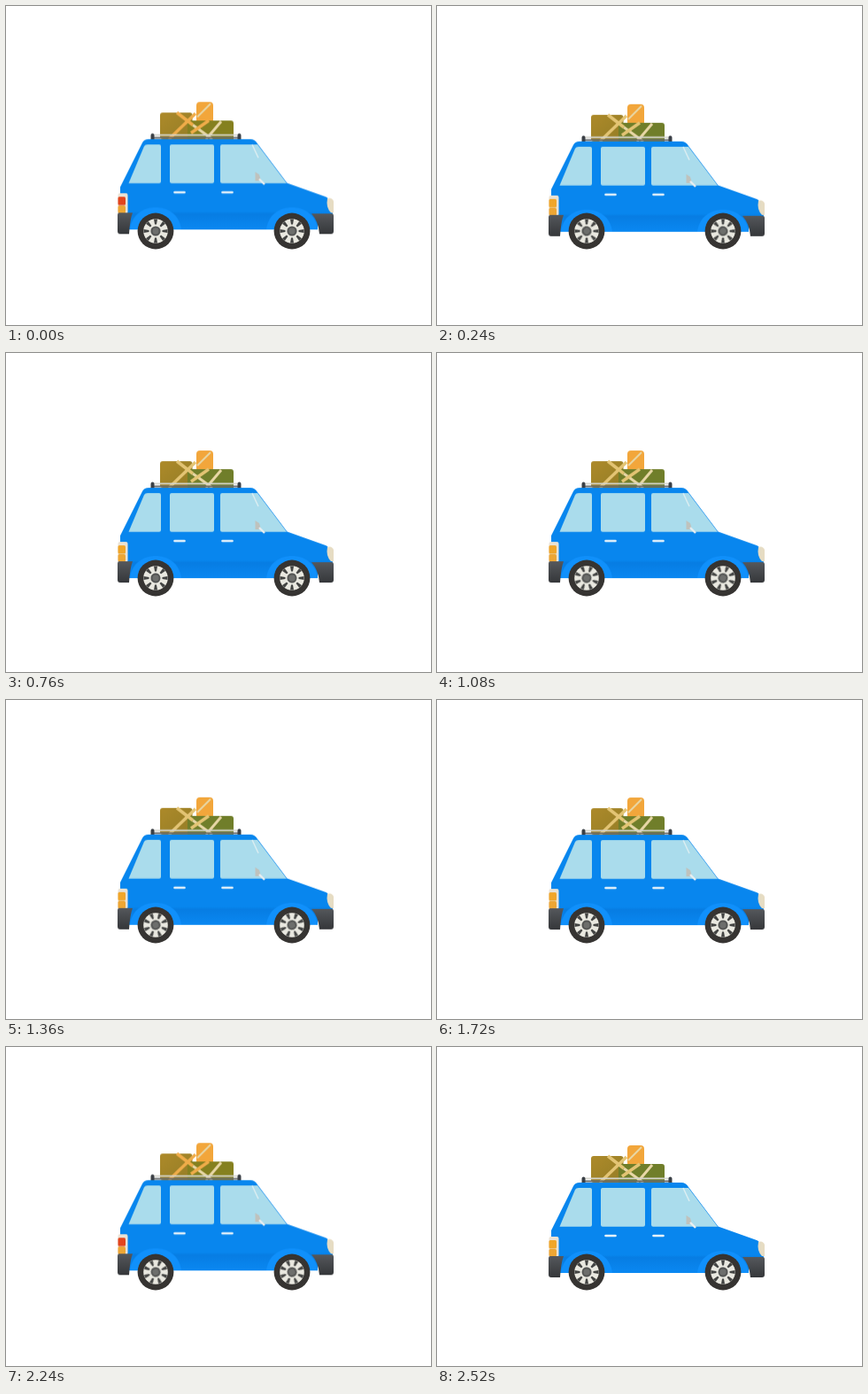
An HTML page for the animation above (2560 ms loop, 480 by 360 pixels).

```html
<!DOCTYPE html>
<html lang="en">
<head>
<meta charset="utf-8">
<title>Loaded car</title>
<style>
  html, body { margin: 0; width: 100%; height: 100%; overflow: hidden; background: #fff; }
  svg { display: block; width: 480px; height: 360px; }
  .car { animation: bounce 320ms step-end infinite; }
  .spin { animation: spin 640ms steps(16) infinite; }
  .lamp { fill: #f0a62a; animation: lamp 320ms step-end infinite; }
  .strap { stroke: #e3c474; animation: strap 320ms step-end infinite; }
  .case { fill: #707e2a; animation: case 320ms step-end infinite; }
  @keyframes bounce {
    0% { transform: translateY(.3px); }
    12.5% { transform: translateY(1.2px); }
    25% { transform: translateY(1.8px); }
    37.5% { transform: translateY(2.1px); }
    50% { transform: translateY(2.4px); }
    62.5% { transform: translateY(2.6px); }
    75% { transform: translateY(2.8px); }
    87.5%, 100% { transform: translateY(3px); }
  }
  @keyframes spin { to { transform: rotate(360deg); } }
  @keyframes lamp { 0% { fill: #e2451e; } 12.5%, 100% { fill: #f0a62a; } }
  @keyframes strap { 0% { stroke: #efac49; } 12.5%, 100% { stroke: #e3c474; } }
  @keyframes case { 0% { fill: #85801f; } 12.5%, 100% { fill: #707e2a; } }
</style>
</head>
<body>
<svg viewBox="0 0 480 360">
  <defs>
    <linearGradient id="paint" x2="0" y2="1">
      <stop offset="0" stop-color="#0886ee"/>
      <stop offset=".8" stop-color="#0886ee"/>
      <stop offset=".83" stop-color="#077de3"/>
      <stop offset="1" stop-color="#0a88f2"/>
    </linearGradient>
    <linearGradient id="rubber" x2="0" y2="1">
      <stop offset="0" stop-color="#55585c"/>
      <stop offset="1" stop-color="#35373a"/>
    </linearGradient>
    <linearGradient id="box" x2="1" y2="1">
      <stop offset="0" stop-color="#ad8a2a"/>
      <stop offset="1" stop-color="#947d26"/>
    </linearGradient>
    <g id="wheel">
      <circle r="20.4" fill="#363432"/>
      <circle r="13.8" fill="#e9e8e0"/>
      <g class="spin">
        <g fill="#434443">
          <path id="pair" d="M-2-13.500H2L1-7.500H-1ZM-2 13.500H2L1 7.500H-1Z"/>
          <use href="#pair" transform="rotate(45)"/>
          <use href="#pair" transform="rotate(90)"/>
          <use href="#pair" transform="rotate(135)"/>
        </g>
        <circle r="5.6" fill="#555655"/>
        <circle r="3.4" fill="#6d6e6c"/>
      </g>
    </g>
    <path id="handle" d="M0 0H11" stroke="#e5f2fa" stroke-width="2.6" stroke-linecap="round"/>
    <path id="arch" d="M-29 0C-27-17-14-25 0-25S27-17 29 0Z" fill="#1090fb"/>
  </defs>

  <g class="car">
    <rect x="174" y="120" width="36.500" height="30" rx="3" fill="url(#box)"/>
    <rect x="215" y="108" width="19" height="24" rx="4" fill="#f2a63b"/>
    <path class="case" d="M205 150V133Q205 129 209 129H254Q257 129 257 132V150Z"/>
    <g fill="none" stroke="#e8d7a6" stroke-width="3">
      <path d="M211 134L233 150M226 150L243 130"/>
      <path d="M216 125L231 110" stroke-width="2"/>
      <path class="strap" d="M184 150L214 121M193 120L211 134M209 143L229 129" stroke-width="3.500"/>
    </g>
    <path d="M165 148.500H264" stroke="#666b6c" stroke-width="2"/>
    <path d="M164 145.300H265" stroke="#d5d5cd" stroke-width="1.800"/>
    <path d="M165.500 145.500V151M263.500 145.500V151" stroke="#3b4046" stroke-width="4" stroke-linecap="round"/>

    <path fill="url(#paint)" d="M129 235V204L154 154Q156 150 161 150H276Q281 150 284 155L317.500 199.500L361 215Q367 217 369 235V247H352V252H138V247H130Z"/>
    <use href="#arch" x="169" y="252"/>
    <use href="#arch" x="323" y="252"/>

    <g fill="#aadcec">
      <path d="M138.500 199.700L156 158Q157 156 160 156H173Q175 156 175 158V197.700Q175 199.700 173 199.700Z"/>
      <rect x="185" y="156" width="50" height="43.700" rx="2"/>
      <path d="M242 158Q242 156 244 156H284L317 199.700H244Q242 199.700 242 197.700Z"/>
    </g>
    <path d="M278 156L285 171" stroke="#dceef2" stroke-width="1.500"/>
    <path d="M281.500 187L286 190L288 197H281.500Z" fill="#bfc2bd"/>
    <path d="M286 195L292 201" stroke="#e9eef0" stroke-width="2.400"/>
    <use href="#handle" x="190.500" y="210"/>
    <use href="#handle" x="244.500" y="210"/>

    <rect x="126.500" y="211" width="11" height="23" rx="2" fill="#e9e2d5"/>
    <rect class="lamp" x="126.500" y="215" width="8.500" height="9.500" rx="1.500"/>
    <rect x="126.500" y="225" width="8.500" height="8.500" rx="1.500" fill="#eda634"/>
    <path d="M363 217Q368 215 370 220V233H367Q361 227 363 217Z" fill="#e6dcc3"/>
    <path d="M128 233H143Q140 241 139 257H129Q126 257 126 254V235Q126 233 128 233Z" fill="url(#rubber)"/>
    <path d="M345 234H368Q370 234 370 236V254Q370 257 367 257H354Q353 243 345 234Z" fill="url(#rubber)"/>
  </g>

  <use href="#wheel" x="169" y="254"/>
  <use href="#wheel" x="323" y="254"/>
</svg>
</body>
</html>
```
